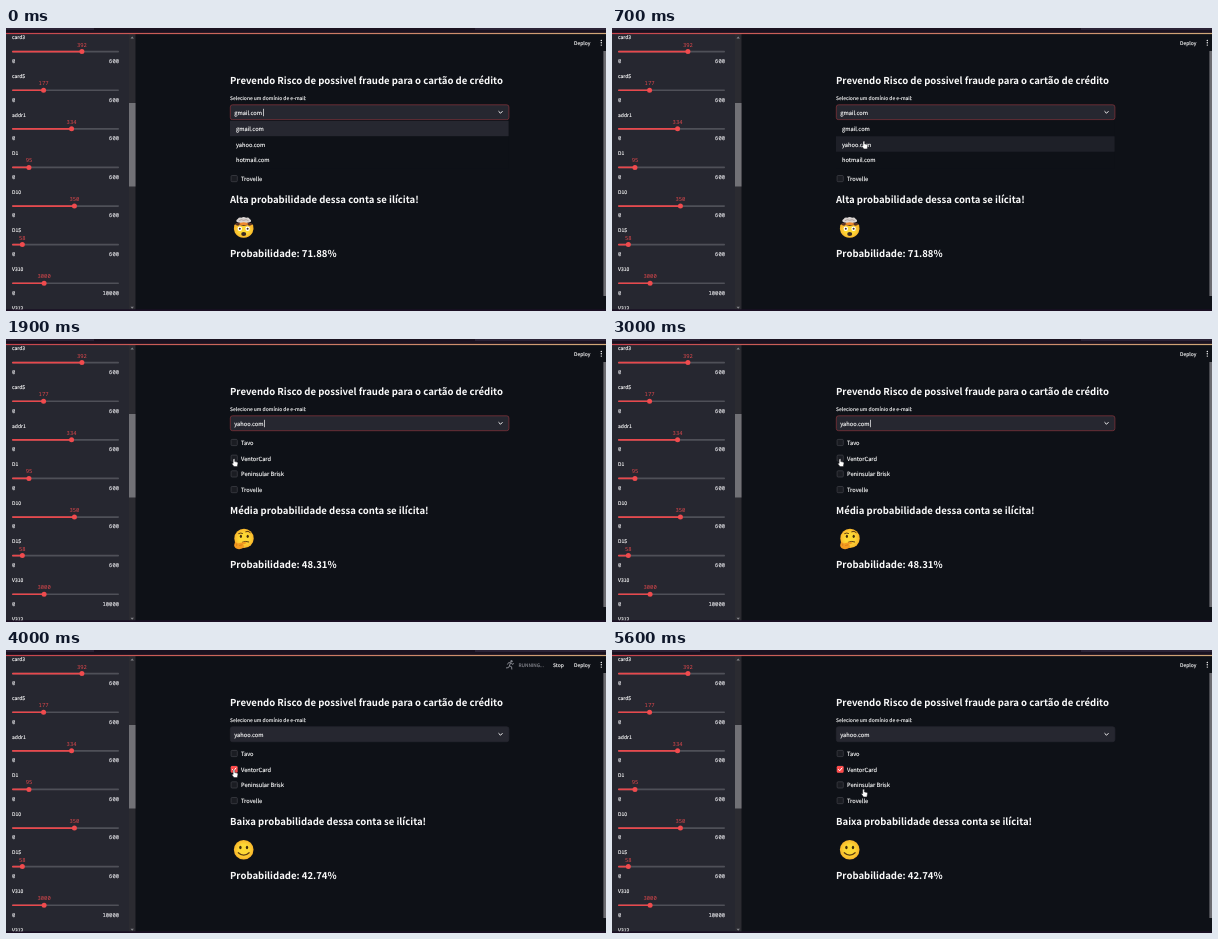
Recreate the animation shown at these times as an HTML page. Size 600 by 283 pixels, loop 5700 ms.

```html
<!DOCTYPE html>
<html lang="pt">
<head>
<meta charset="utf-8">
<title>Risco de fraude</title>
<style>
html, body { margin: 0; width: 100%; height: 100%; overflow: hidden; background: #0e1117; }
svg { display: block; width: 100vw; height: 100vh; }
text { font-family: "Noto Sans CJK JP", "Noto Sans CJK SC", "Noto Sans CJK", "Noto Sans", sans-serif; font-size: 5.7px; fill: #fafafa; stroke: #fafafa; stroke-width: .14; white-space: pre; text-rendering: geometricPrecision; }
.small { font-size: 5px; }
.head { font-size: 9.55px; font-weight: 700; stroke: none; }
.mono { font-family: "Noto Sans Mono", "DejaVu Sans Mono", monospace; font-size: 5.5px; fill: #dcdce0; stroke: #dcdce0; }
.red { fill: #e0484c; stroke: none; }
.dim { font-size: 4.75px; fill: #85878e; stroke: #85878e; }
.line { fill: none; stroke-linecap: round; stroke-linejoin: round; }
</style>
</head>
<body>
<svg id="stage" viewBox="0 0 600 283" preserveAspectRatio="none">
  <defs>
    <linearGradient id="bar"><stop offset="0" stop-color="#c8434c"/><stop offset="1" stop-color="#d0a878"/></linearGradient>
    <radialGradient id="skin"><stop offset=".5" stop-color="#fdd835"/><stop offset="1" stop-color="#f9b52b"/></radialGradient>
  </defs>
  <rect width="600" height="283" fill="#0e1117"/>
  <rect width="123" height="283" fill="#262730"/>
  <g id="sidebar"></g>
  <rect x="123" y="6" width="6.5" height="276" fill="#2b2b31"/>
  <rect x="123" y="75" width="6.5" height="83.5" fill="#717176"/>
  <path d="M124.5 10.5l1.7-2 1.7 2zM124.5 278.7l1.7 2 1.7-2z" fill="#85858a"/>
  <rect x="597.4" y="23" width="2.6" height="245" fill="#6c6c71"/>
  <rect width="600" height="5" fill="#1a1220"/>
  <path d="M0 0H88V2H0zM469 0H600V2H469z" fill="#2b2336"/>
  <rect y="4.9" width="600" height="1.2" fill="url(#bar)"/>
  <rect y="281.3" width="600" height="1.7" fill="#1b0f24"/>

  <text class="small" x="568" y="16.6">Deploy</text>
  <g fill="#fafafa"><circle cx="595.3" cy="12.5" r=".7"/><circle cx="595.3" cy="14.8" r=".7"/><circle cx="595.3" cy="17.1" r=".7"/></g>
  <g id="status">
    <g class="line" stroke="#85878e" stroke-width="1">
      <circle cx="505.4" cy="11.2" r=".7" fill="#85878e"/>
      <path d="M504.6 12.8l-1.2 3"/>
      <path id="limbs"/>
    </g>
    <text class="dim" x="512.6" y="16.5">RUNNING...</text>
    <text class="small" x="547" y="16.6">Stop</text>
  </g>

  <text class="head" x="224" y="56.1">Prevendo Risco de possivel fraude para o cartão de crédito</text>
  <text class="small" x="224" y="72.2">Selecione um domínio de e-mail:</text>
  <rect id="field" x="224.3" y="76.8" width="278.6" height="14.9" rx="2.2" fill="#262730" stroke-width=".7"/>
  <text id="domain" x="228.2" y="86.8"></text>
  <rect id="caret" y="80.8" width=".7" height="7.4" fill="#fafafa"/>
  <path class="line" d="M492.8 83.5l1.7 1.7 1.7-1.7" stroke="#fafafa"/>

  <g id="checks"></g>
  <g id="menu">
    <rect x="224" y="92.4" width="278.6" height="48" fill="#0e1117"/>
    <rect id="hover" x="224" width="278.6" height="15.4"/>
    <text x="230" y="102.8">gmail.com</text>
    <text x="230" y="118.5">yahoo.com</text>
    <text x="230" y="134.2">hotmail.com</text>
  </g>

  <text id="verdict" class="head" x="224" y="174.6"></text>
  <g id="faces" transform="translate(237.7 199.7)">
    <g>
      <path d="M-9.4-2.6Q-8-4.6-5-4.4H5Q8-4.6 9.4-2.6 10.5 1 8.8 5 5.7 10 0 10-5.7 10-8.8 5-10.5 1-9.4-2.6z" fill="url(#skin)"/>
      <path d="M-8.8-3.4Q-6-6 0-6T8.8-3.4Q6.4-1.2 4-2.6 0-1-4-2.6-6.4-1.2-8.8-3.4z" fill="#5a3326"/>
      <path d="M-4.5-3.2L-3-6.5H3L4.5-3.2Q0-2-4.5-3.2z" fill="#f08a2c"/>
      <path d="M-6.6-5.6Q-8.4-7.2-6-8.8-4.6-10.8-2.4-10 0-11.4 2.4-10 4.8-10.8 6-8.8 8.4-7.2 6.6-5.6 3.6-4.6 0-5.4-3.6-4.6-6.6-5.6z" fill="#d9d3d0"/>
      <path d="M-4.6-7.2Q-2.4-8.8 0-7.4 2.4-8.8 4.6-7.2" class="line" stroke="#9b8d88" stroke-width=".7"/>
      <g fill="#fff"><circle cx="-3.9" cy="1" r="2.2"/><circle cx="3.9" cy="1" r="2.2"/></g>
      <g fill="#3b2b25"><circle cx="-3.9" cy="1" r="1"/><circle cx="3.9" cy="1" r="1"/><ellipse cy="6.3" rx="2.5" ry="1.9"/></g>
    </g>
    <g>
      <circle r="9.7" cx=".3" cy="-.3" fill="url(#skin)"/>
      <g fill="#422b0d"><ellipse cx="-2.8" cy="-2.4" rx="1.1" ry="1.6"/><ellipse cx="4" cy="-2.4" rx="1.1" ry="1.6"/></g>
      <path class="line" d="M-5-5.2Q-3-6.2-1.2-5.3M2-7Q4.4-8.4 6.5-6.2M-1.3 3.5Q2 2 5 3.2" stroke="#5d3b12" stroke-width="1"/>
      <path d="M-8.7 3.2Q-7.4 2.6-6.8 5L-1 3.6Q2.6 3 2.8 4.3 2.8 5.1-1.6 6.1 1 6.5.2 8.4-1 10.6-4.8 10.5-9.3 10.2-9.6 6.6z" fill="#f39a20"/>
      <path class="line" d="M-6.8 5l-.3 1.7M-1.6 6.1l-2.5.7" stroke="#c9701a" stroke-width=".6"/>
    </g>
    <g>
      <circle r="9.8" fill="url(#skin)"/>
      <g fill="#422b0d"><ellipse cx="-3.3" cy="-2.2" rx="1.2" ry="1.8"/><ellipse cx="3.3" cy="-2.2" rx="1.2" ry="1.8"/></g>
      <path class="line" d="M-5.4 3Q0 8 5.4 3" stroke="#5d3b12" stroke-width="1.2"/>
    </g>
  </g>
  <text id="chance" class="head" x="224" y="228.9"></text>

  <path id="hand" d="M0 0Q.9-.5 1.2.4V2.6L3.6 3.1Q4.5 3.4 4.3 4.4L3.7 7.6H.4L-1.8 4.8Q-1.8 3.9-.5 4.4V.5Q-.4.1 0 0z" fill="#fff" stroke="#16161a" stroke-width=".45"/>
</svg>
<script>
const LOOP = 5700;
const $ = id => document.getElementById(id);
const show = (el, on) => el.setAttribute('visibility', on ? 'inherit' : 'hidden');
const set = (el, attrs) => { for (const k in attrs) el.setAttribute(k, attrs[k]); };
const between = (t, a, b) => t >= a && t < b;

const sliders = [['card3', 392, 600], ['card5', 177, 600], ['addr1', 334, 600], ['D1', 95, 600],
  ['D10', 350, 600], ['D15', 58, 600], ['V310', 3000, 10000], ['V312', 0, 600]];
$('sidebar').innerHTML = sliders.map(([name, value, max], i) => {
  const x = 6 + 107 * value / max;
  return `<g transform="translate(0 ${i * 38.6 + .2})">
    <text class="small" x="6" y="11.3">${name}</text>
    <text class="mono red" x="${x}" y="18.4" text-anchor="middle">${value}</text>
    <rect x="6" y="22.6" width="107" height="1.7" rx=".8" fill="#4f5058"/>
    <rect x="6" y="22.6" width="${x - 6}" height="1.7" rx=".8" fill="#e8484c"/>
    <circle cx="${x}" cy="23.4" r="2.5" fill="#f04b4e"/>
    <text class="mono" x="6" y="34.8">0</text>
    <text class="mono" x="113" y="34.8" text-anchor="end">${max}</text></g>`;
}).join('');

$('checks').innerHTML = ['Tavo', 'VentorCard', 'Peninsular Brisk', 'Trovelle'].map((name, i) => {
  const y = 103.5 + 15.7 * i;
  return `<rect x="225.1" y="${y - 3.1}" width="6.2" height="6.2" rx="1" fill="#1a1c22" stroke="#414249" stroke-width=".7"/>
    <text x="235" y="${y + 2.4}">${name}</text>`;
}).join('') + `<g id="tick"><rect x="224.8" y="116" width="6.8" height="6.8" rx="1.2" fill="#ff4b4b"/>
  <path class="line" d="M226.5 119.5l1.2 1.3 2.3-2.8" stroke="#fff" stroke-width="1"/></g>`;

const OPENED_UNTIL = 800, CHECKED_AT = 3600;
const results = [
  { from: 0, level: 'Alta', chance: '71.88' },
  { from: 1500, level: 'Média', chance: '48.31' },
  { from: 3900, level: 'Baixa', chance: '42.74' }
];
const path = [[100, 255, 90], [350, 251.5, 113.3], [900, 251.5, 113.3], [1200, 248, 115.5], [1700, 227.6, 120],
  [4950, 227.6, 120], [5400, 250.5, 147], [5600, 251.2, 139.3], [5700, 251.2, 139.3]];

function pointer(t) {
  const i = Math.max(1, path.findIndex(p => p[0] > t));
  const [t0, x0, y0] = path[i - 1], [t1, x1, y1] = path[i];
  const u = Math.max(0, (t - t0) / (t1 - t0)), k = u * u * (3 - 2 * u);
  return [x0 + (x1 - x0) * k, y0 + (y1 - y0) * k];
}

function draw(t) {
  const open = t < OPENED_UNTIL, focused = t < CHECKED_AT;
  $('domain').textContent = open ? 'gmail.com' : 'yahoo.com';
  $('field').setAttribute('stroke', focused ? '#88343b' : '#262730');
  set($('caret'), { x: open ? 257 : 258.3 });
  show($('caret'), open ? t < 200 : focused && (t - OPENED_UNTIL) % 1060 < 530);

  show($('menu'), open);
  const onFirst = t < 250;
  set($('hover'), { y: onFirst ? 92.8 : 108.3, fill: onFirst ? '#262730' : '#1e2028' });
  show($('tick'), !focused);

  show($('status'), between(t, 1100, 1600) || between(t, 3700, 4200));
  $('limbs').setAttribute('d', Math.floor(t / 100) % 2
    ? 'M501.4 14.2l1-1.6 2.2.2 1.2 1.5h1.4M503.4 15.8l2 1.2-.2 2.2M503.4 15.8l-1 1.6-2 .2'
    : 'M501.6 14.2l1-1.6 2 .2 1.4 1.5 1.5-.6M503.4 15.8l2.2 1 .2 2.3M503.4 15.8l-.8 1.8-2.2.3');

  const current = results.filter(r => t >= r.from).length - 1;
  const { level, chance } = results[current];
  $('verdict').textContent = `${level} probabilidade dessa conta se ilícita!`;
  $('chance').textContent = `Probabilidade: ${chance}%`;
  [...$('faces').children].forEach((face, i) => show(face, i === current));

  show($('hand'), t >= 100);
  set($('hand'), { transform: `translate(${pointer(t)})` });
}

const start = performance.now();
function tick() {
  draw((performance.now() - start) % LOOP);
  requestAnimationFrame(tick);
}
tick();
</script>
</body>
</html>
```
